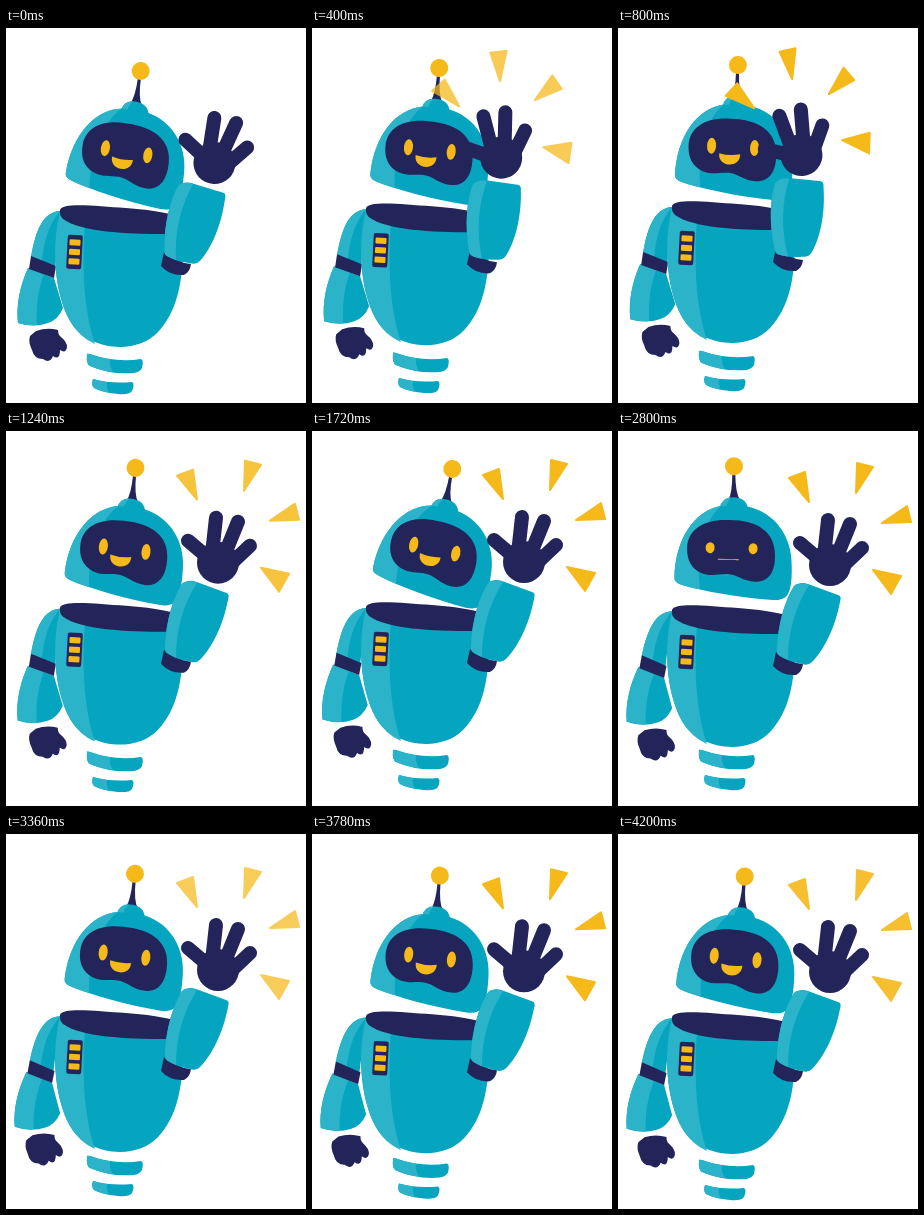
An HTML page for the animation above (4.22 s loop, 300 by 375 pixels).

```html
<!DOCTYPE html>
<html lang="en">
<head>
<meta charset="utf-8">
<title>Waving robot</title>
<style>
  html, body { margin: 0; width: 100%; height: 100%; overflow: hidden; background: #fff; }
  svg { display: block; width: 100%; height: 100%; }
  .main { fill: #05a4bf; }
  .light { fill: #2bb4c9; }
  .navy { fill: #23255a; }
  .gold { fill: #f5b91a; }
  .fingers { fill: none; stroke: #23255a; stroke-width: 14; stroke-linecap: round; }
  #rays { stroke: #f5b91a; stroke-width: 2; stroke-linejoin: round; }
</style>
</head>
<body>
<svg viewBox="0 0 300 375">
  <g id="jets">
    <path class="main" d="M81 327Q80 325 84 326Q110 335 135 331Q138 332 136 340Q134 344 128 345Q105 347 84 338Q80 336 81 327Z"/>
    <path class="light" d="M81 327Q80 325 84 326Q93 330 104 331Q103 338 107 344Q95 343 84 338Q80 336 81 327Z"/>
    <path class="main" d="M87 351Q105 356 126 354Q129 356 126 363Q123 367 112 366Q95 364 88 360Q85 357 87 351Z"/>
    <path class="light" d="M87 351Q93 353 101 354Q100 359 103 365Q94 363 88 360Q85 357 87 351Z"/>
  </g>

  <g id="head">
    <path class="navy" d="M-7 -97Q-3 -104 -3.5 -124L-.5 -124Q0 -104 5 -97Z"/>
    <circle class="gold" cx="-2" cy="-131" r="9"/>
    <path class="main" d="M-15 -89Q-14 -99 -2 -100Q11 -100 13 -89Z"/>
    <path class="light" d="M-15 -89Q-14 -99 -4 -100Q-8 -96 -9 -89Z"/>
    <path class="main" d="M-59 -18C-59 -58 -40 -86 -14 -91L12 -91C40 -86 58 -62 58 -32Q59 -10 54 -3Q50 2 40 2C5 0 -30 -5 -54 -12Q-59 -14 -59 -18Z"/>
    <path class="light" d="M-59 -18C-59 -58 -40 -86 -14 -91C-32 -75 -38 -40 -33 -7Q-46 -9 -54 -12Q-59 -14 -59 -18Z"/>
    <path class="navy" d="M-47 -48C-47 -66 -32 -77 -7 -77C23 -78 40 -66 41 -44C42 -26 35 -16 22 -16C9 -16 4 -23 -6 -23C-16 -23 -21 -20 -31 -23C-42 -27 -47 -36 -47 -48Z"/>
    <ellipse class="gold eye" cx="-24" cy="-49" rx="4.5"/>
    <ellipse class="gold eye" cx="19" cy="-49" rx="4.5"/>
    <path id="mouth" class="gold"/>
  </g>

  <g id="body">
    <g id="leftArm">
      <path class="main" d="M54 183C38 184 30 200 25 229L49 238L52 205Z"/>
      <path class="light" d="M54 183C38 184 30 200 25 229L36 233C38 210 44 195 54 183Z"/>
      <path class="main" d="M22 240C14 258 10 277 12 295Q28 300 42 295Q52 292 57 280L48 250Z"/>
      <path class="light" d="M22 240C14 258 10 277 12 295Q22 298 31 297C30 278 32 262 38 246Z"/>
      <path class="navy" d="M25 228L50 238L48 250L23 241Z"/>
      <path class="navy" d="M30 303Q41 299 52 302Q52 307 55 309Q61 314 61 319Q60 326 54 322Q54 333 47 328Q44 336 37 331Q28 331 26 322Q22 314 24 308Z"/>
    </g>
    <path class="main" d="M54 184C46 215 47 262 64 293C80 322 130 328 152 304C171 284 176 255 177 225L176 196Z"/>
    <path class="light" d="M54 184C46 215 47 262 64 293Q73 309 89 316C77 280 76 235 79 196Z"/>
    <path class="navy" d="M54 182C56 174 90 178 120 180C150 182 175 187 178 193Q177 206 160 206C120 206 75 204 57 191Q53 187 54 182Z"/>
    <g transform="rotate(3 68.5 224)">
      <rect class="navy" x="61" y="207" width="15" height="34" rx="2"/>
      <rect class="gold" x="63" y="211.500" width="11" height="6" rx="1"/>
      <rect class="gold" x="63" y="221" width="11" height="6" rx="1"/>
      <rect class="gold" x="63" y="230.500" width="11" height="6" rx="1"/>
    </g>
    <path class="navy" d="M158 224Q168 234 185 236Q184 244 178 247Q164 248 155 238Z"/>
    <g id="forearm">
      <path class="main" d="M180 156Q184 154 190 156L220 167Q224 168 222 174C217 200 206 222 194 234Q190 238 184 236Q170 233 162 228Q158 226 159 220C160 196 167 172 176 158Q178 156 180 156Z"/>
      <path class="light" d="M180 156Q184 154 191 157C178 178 170 202 170 232Q165 230 162 228Q158 226 159 220C160 196 167 172 176 158Q178 156 180 156Z"/>
      <g id="hand">
        <ellipse class="navy" cx="212" cy="137" rx="21" ry="21"/>
        <path class="fingers" d="M182 115L202 132M210 92L206 128M232 96L219 128M244 120L225 138"/>
        <path id="rays" class="gold" d="M171 50L187 44L191 74ZM239 35L255 39L238 65ZM289 78L293 94L264 95ZM255 142L283 148L273 166Z"/>
      </g>
    </g>
  </g>
</svg>
<script>
const LOOP = 4220;
const $ = id => document.getElementById(id);
const eyes = document.querySelectorAll('.eye');

// Keys are [time, value] pairs joined by a smooth curve that never overshoots.
function track(...keys) {
  const gradient = i => (keys[i + 1][1] - keys[i][1]) / (keys[i + 1][0] - keys[i][0]);
  const slope = i => {
    if (i === 0 || i === keys.length - 1) return 0;
    const a = gradient(i - 1), b = gradient(i);
    return a * b > 0 ? 2 * a * b / (a + b) : 0;
  };
  return t => {
    if (t <= keys[0][0]) return keys[0][1];
    const i = keys.findIndex(k => k[0] > t) - 1;
    if (i < 0) return keys[keys.length - 1][1];
    const [t0, v0] = keys[i], [t1, v1] = keys[i + 1];
    const d = t1 - t0, u = (t - t0) / d, w = 1 - u;
    return v0 * w * w * (1 + 2 * u) + v1 * u * u * (3 - 2 * u)
      + d * u * w * (slope(i) * w - slope(i + 1) * u);
  };
}

const bodyY = track([0, 0], [800, -4], [1720, -6], [2360, -5], [2800, -3], [3360, -1], [4200, 1]);
const jetsY = track([0, 0], [800, -3], [1720, -7], [2360, -8], [2800, -7], [3360, -4], [4200, 0]);
const headY = track([0, 172.5], [800, 168], [1720, 166.5], [2500, 166], [2800, 166.2], [3360, 170], [4200, 173]);
const headTilt = track([0, 9.5], [800, 3], [1720, 12], [2360, 8.3], [2800, 1.3], [3360, 7], [4200, 6]);
const leftSwing = track([0, 0], [800, -.2], [1720, .8], [2360, 1.8], [4200, 1.8]);
const forearmSwing = track([0, -3], [300, -17], [590, 1], [860, -17], [1240, 0]);
const handSwing = track([0, 5.5], [300, -13], [590, 2], [860, -14], [1240, 0]);
const eyeHeight = track([0, 8], [2260, 8], [2340, .6], [2390, .6], [2480, 8], [2620, 8], [2750, 5.5], [2900, 5.5], [3100, 8]);
const smile = track([0, 1], [2500, 1], [2740, 0], [2900, 0], [3150, 1]);
const raysIn = track([60, 0], [240, 1]);

function rotate(id, angle, x, y) {
  $(id).setAttribute('transform', `rotate(${angle} ${x} ${y})`);
}

function draw(t) {
  $('body').setAttribute('transform', `translate(0 ${bodyY(t)})`);
  $('jets').setAttribute('transform', `translate(0 ${jetsY(t)})`);
  $('head').setAttribute('transform', `translate(115 ${headY(t)}) rotate(${headTilt(t)})`);
  rotate('leftArm', leftSwing(t), 50, 190);
  rotate('forearm', forearmSwing(t), 172, 232);
  rotate('hand', handSwing(t), 212, 152);

  const pulse = (1 + Math.cos((t - 2360) / 1000 * 2 * Math.PI)) / 2;
  $('rays').setAttribute('opacity', raysIn(t) * (1 - .28 * pulse ** 4));

  eyes.forEach(eye => eye.setAttribute('ry', eyeHeight(t)));
  const s = smile(t), top = -38 - 4 * s, bottom = -37.5 + 9.5 * s;
  $('mouth').setAttribute('d',
    `M-16 ${top}Q-6 ${top + 2.5 * s} 5 ${top}L5 ${top + 1}C5 ${bottom} -16 ${bottom} -16 ${top + 1}Z`);
}

function frame() {
  draw(performance.now() % LOOP);
  requestAnimationFrame(frame);
}
frame();
</script>
</body>
</html>
```
